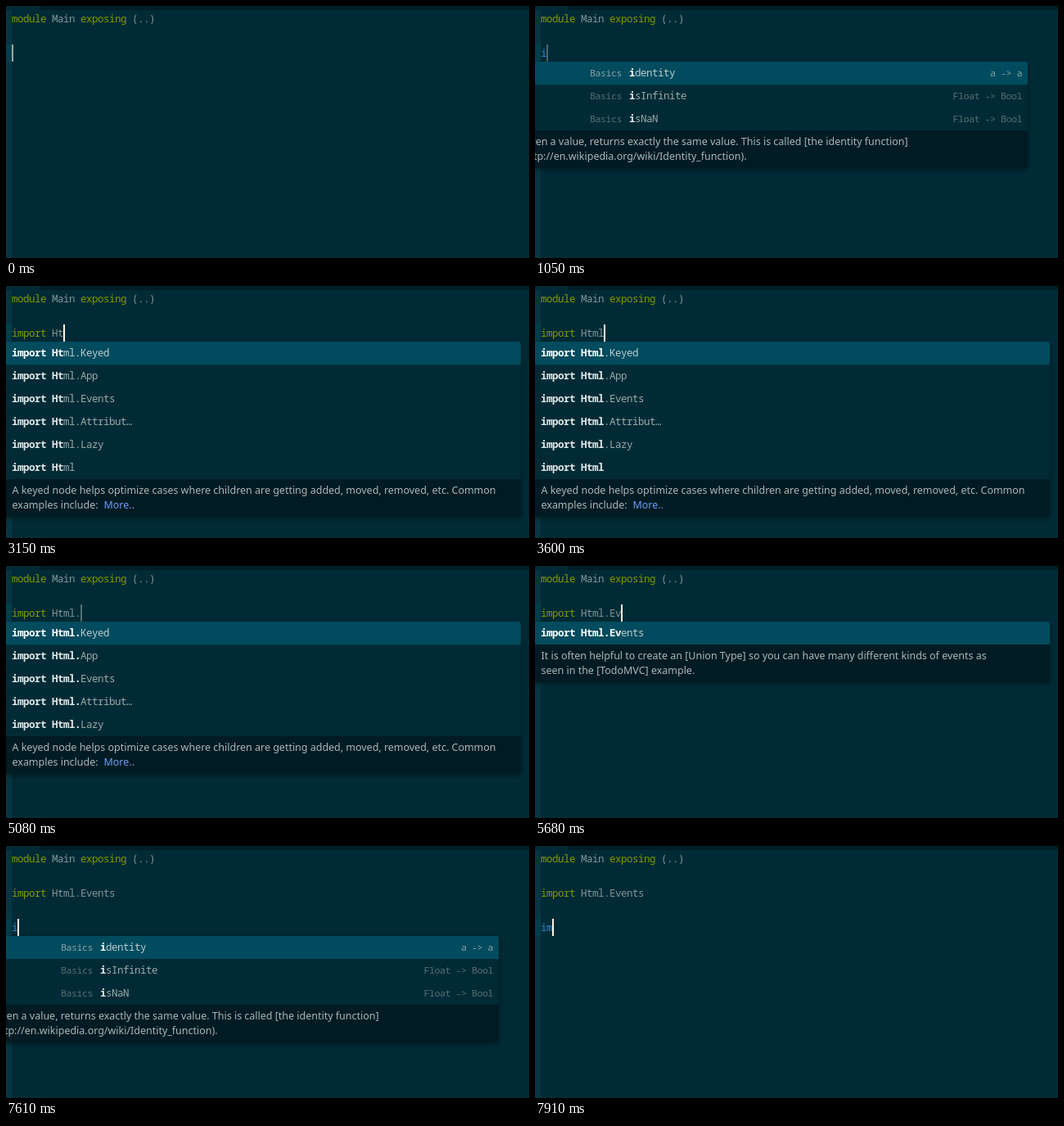
An HTML page that plays this animation: 639 by 308 pixels, repeating every 8000 ms.

```html
<!DOCTYPE html>
<html lang="en">
<head>
<meta charset="utf-8">
<title>Import completion</title>
<style>
html, body { margin: 0; width: 100%; height: 100%; overflow: hidden; background: #002b36; }
#stage { position: relative; width: 639px; height: 308px; overflow: hidden; background: #002b36;
  font: 12.5px/21px "Noto Sans Mono", monospace; letter-spacing: -.5px; color: #839496; }
#stage div, .row span { position: absolute; white-space: pre; }
.tabs { left: 41px; top: 0; width: 598px; height: 5px; background: #001e27; }
.gutter { left: 0; top: 5px; width: 7px; height: 303px; background: #073642; }
#mark { left: 0; width: 7px; height: 21px; background: #003f4b; }
#code { left: 7px; top: 5px; }
.key { color: #859900; }
.new { color: #268bd2; }
#caret { width: 2px; height: 21px; background: #fdf6e3; }
#menu { left: -26px; background: #002b36; border-radius: 0 3px 3px 0; box-shadow: 0 2px 6px rgba(0, 0, 0, .4); overflow: hidden; }
.row { left: 0; width: 100%; height: 28px; line-height: 28px; color: #9caaab; }
.row b { color: #dfe8e8; }
.row .side { font-size: 11.667px; color: #586e75; }
.row.on { background: #004b5e; color: #bccccd; }
.row.on b { color: #fff; }
.row.on .side { color: #8aa3a8; }
.doc { left: 0; width: 100%; height: 46px; background: #001b23; }
.doc p { position: absolute; margin: 0; top: 5px; font: 12.47px/18px "Noto Sans", sans-serif; letter-spacing: 0; color: #abb8b9; }
.doc i { position: absolute; left: 112px; top: 18px; font-style: normal; color: #6c9ef8; }
</style>
</head>
<body>
<div id="stage">
  <div class="tabs"></div>
  <div class="gutter"></div>
  <div id="mark"></div>
  <div id="code"></div>
  <div id="caret"></div>
  <div id="menu"></div>
</div>
<script>
const LOOP = 8000, LINE = 21, ROW = 28, CHAR = 7, LEFT = 26;
const $ = id => document.getElementById(id);

const basics = [['identity', 'a -> a'], ['isInfinite', 'Float -> Bool'], ['isNaN', 'Float -> Bool']];
const modules = ['Array', 'Basics', 'Bitwise', 'Char', 'Color', 'Date', 'Html.Keyed', 'Html.App',
  'Html.Events', 'Html.Attribut…', 'Html.Lazy', 'Html'].map(name => 'import ' + name);
const docs = {
  identity: 'Given a value, returns exactly the same value. This is called [the identity function]\n(http://en.wikipedia.org/wiki/Identity_function).',
  'import Html.Keyed': 'A keyed node helps optimize cases where children are getting added, moved, removed, etc. Common\nexamples include:<i>More..</i>',
  'import Html.Events': 'It is often helpful to create an [Union Type] so you can have many different kinds of events as\nseen in the [TodoMVC] example.'
};

// Each step: time, text after the header, menu kind.
const steps = [[0, '', '']];
const add = (at, text, menu = '') => steps.push([at, text, menu]);
const type = (at, gap, base, word, menu) =>
  [...word].forEach((c, i) => add(at + i * gap, base + word.slice(0, i + 1), menu));

add(300, 'i');
add(450, 'i', 'basics');
add(1350, 'im');
add(1500, 'im', 'word');
type(1650, 150, 'im', 'port ', 'word');
add(2400, 'import ', 'modules');
type(3000, 150, 'import ', 'Html', 'modules');
add(4340, 'import Html.', 'modules');
type(5530, 148, 'import Html.', 'Events', 'modules');
const done = 'import Html.Events';
add(6420, done);
add(6720, done + '\n');
add(7010, done + '\n\n');
add(7460, done + '\n\ni');
add(7610, done + '\n\ni', 'basics');
add(7910, done + '\n\nim');

const smooth = x => x * x * (3 - 2 * x);

// Solid after a key press, then fading out and in once a second.
function blink(age) {
  if (age < 600) return 1;
  const u = (age - 600) % 1000;
  if (u < 350) return 1 - smooth(u / 350);
  if (u < 450) return 0;
  return u < 800 ? smooth((u - 450) / 350) : 1;
}

function paint(line) {
  const [, word, rest] = line.match(/^(\w*)(.*)$/);
  return `<span class="${word === 'import' ? 'key' : 'new'}">${word}</span>${rest}`;
}

function rowHtml(i, inner) {
  return `<div class="row${i ? '' : ' on'}" style="top:${i * ROW}px">${inner}</div>`;
}

function cell(style, inner, side) {
  return `<span class="${side ? 'side' : ''}" style="${style}">${inner}</span>`;
}

function matched(label, n) {
  return `<b>${label.slice(0, n)}</b>${label.slice(n)}`;
}

function drawMenu(kind, line, top) {
  const box = $('menu');
  box.style.display = kind ? 'block' : 'none';
  if (!kind) return;
  let html, first, count, width = 629, docLeft = 7.5;
  if (kind === 'basics') {
    width = 602;
    docLeft = -18;
    first = 'identity';
    count = basics.length;
    html = basics.map(([name, sig], i) => rowHtml(i,
      cell(`left:${67 + LEFT}px`, 'Basics', true) +
      cell(`left:${115 + LEFT}px`, matched(name, line.length)) +
      cell('right:7px', sig.replace('>', '&gt;'), true))).join('');
  } else {
    const list = kind === 'word' ? ['import'] : modules.filter(m => m.startsWith(line));
    if (kind === 'word') width = 200;
    first = list[0];
    count = list.length;
    html = list.map((m, i) => rowHtml(i, cell(`left:${7 + LEFT}px`, matched(m, line.length)))).join('');
  }
  const doc = docs[first];
  if (doc) html += `<div class="doc" style="top:${count * ROW}px"><p style="left:${docLeft + LEFT}px">${doc}</p></div>`;
  box.style.top = top + 'px';
  box.style.width = width + LEFT + 'px';
  box.style.height = count * ROW + (doc ? 46 : 0) + 'px';
  box.innerHTML = html;
}

function drawStep([, text, menu]) {
  const lines = text.split('\n');
  const line = lines[lines.length - 1];
  const top = 47 + (lines.length - 1) * LINE;
  $('code').innerHTML = '<span class="key">module</span> Main <span class="key">exposing</span> (..)\n\n' +
    lines.map(paint).join('\n');
  $('caret').style.left = 7 + line.length * CHAR + 'px';
  $('caret').style.top = top + 'px';
  drawMenu(menu, line, top + LINE);
}

let shown = -1;
function draw(t) {
  let now = 0, key = -750;
  steps.forEach(([at, text], i) => {
    if (at > t) return;
    now = i;
    if (i && text !== steps[i - 1][1]) key = at - 75;
  });
  if (now !== shown) drawStep(steps[shown = now]);
  $('mark').style.top = (t < 7460 ? 47 : 89) + 'px';
  const tick = t < 3600 ? Math.floor(t / 150) * 150 : 4040 + Math.floor((t - 4040) / 148.5) * 148.5;
  $('caret').style.opacity = blink(tick - key);
}

const start = performance.now();
function frame() {
  draw((performance.now() - start) % LOOP);
  requestAnimationFrame(frame);
}
frame();
</script>
</body>
</html>
```
